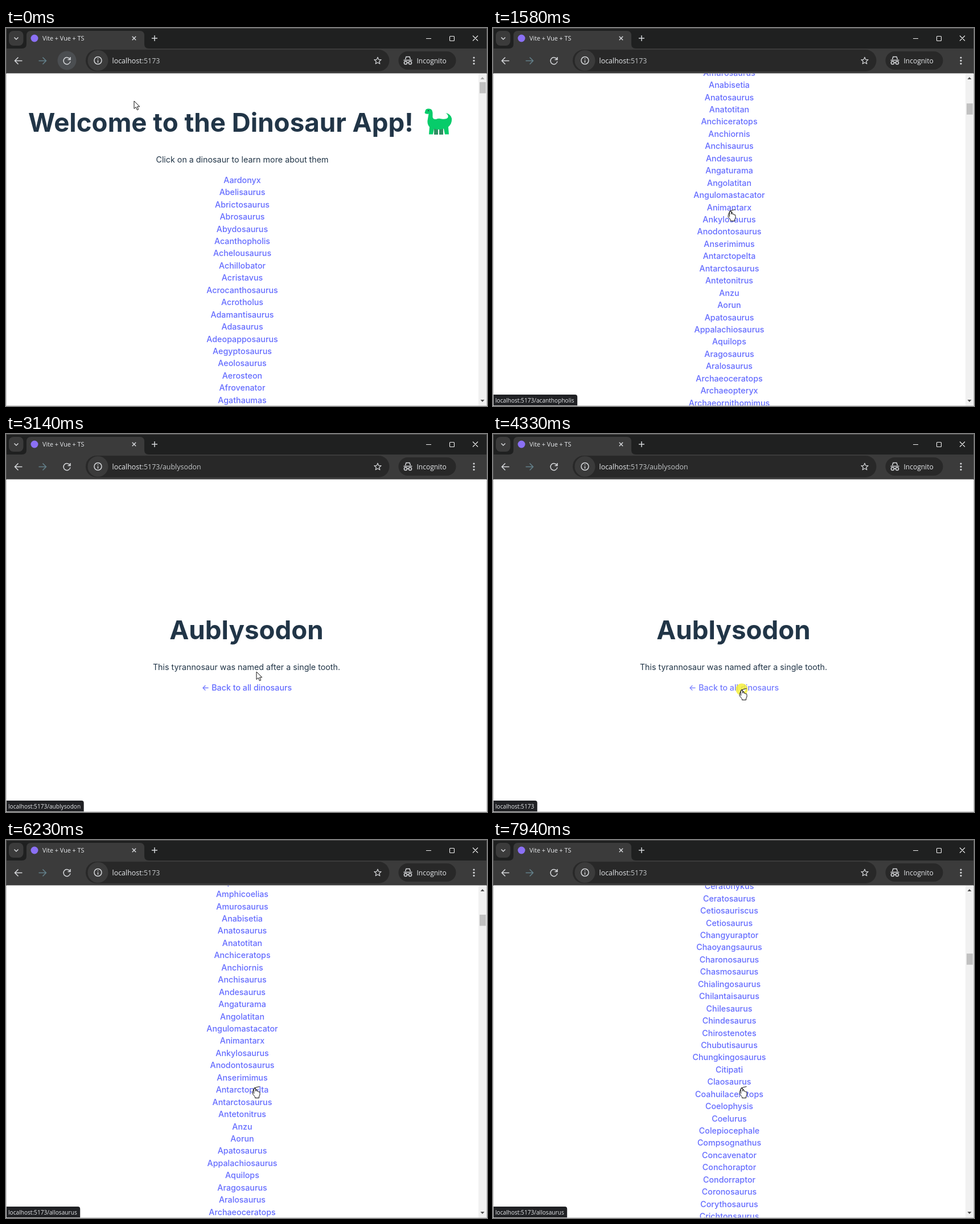
An HTML page that plays this animation: 845 by 663 pixels, repeating every 8 s.

```html
<!DOCTYPE html>
<html lang="en">
<head>
<meta charset="utf-8">
<title>Dinosaur App</title>
<style>
  html, body { margin: 0; width: 100%; height: 100%; overflow: hidden; background: #fff; }
  svg { display: block; }
  .ui { font-family: "Open Sans", sans-serif; fill: #e8eaed; white-space: pre; }
  .page { font-family: Inter, sans-serif; font-size: 14.29px; fill: #213547; }
  .page h1, .title { font-size: 45.7px; font-weight: 700; }
  .link { font-weight: 500; fill: #646cff; }
  .link.hover { fill: #747bff; }
  .mid { text-anchor: middle; }
  .icon { fill: none; stroke: #d5d7da; stroke-width: 1.5; }
  .thin { stroke: #eee; stroke-width: 1.1; }
</style>
</head>
<body>
<svg id="stage" width="845" height="663" viewBox="0 0 845 663">
  <defs>
    <clipPath id="view"><rect x="1" y="80" width="843" height="582"/></clipPath>
  </defs>
  <rect width="845" height="663" fill="#fff"/>

  <g class="page" clip-path="url(#view)">
    <g id="list">
      <text class="title" x="39" y="181.6">Welcome to the Dinosaur App!</text>
      <g id="dino">
        <path fill="#2f8f62" d="M752 174h7v13h-7zM761 174h7v13h-7z"/>
        <path fill="#07cc6a" d="M737 144q1-3 6-2.500q6 0 6.500 7v8q1 4 6 3.500q5-2 10-.5q9 1 11-3q1-4-4-7.500q9 2 10.500 9.500q1 9-6 15l1 13h-7l-2-10q-9 3-17 0l-2 10h-7l1-13q-4-4-3.500-11l2-12q-6 1-7-2z"/>
        <circle cx="742" cy="145" r="1" fill="#213547"/>
      </g>
      <text class="mid" x="415" y="236">Click on a dinosaur to learn more about them</text>
      <g id="rows" class="mid"></g>
    </g>
    <g id="detail" class="mid">
      <text class="title" x="422.500" y="360">Aublysodon</text>
      <text x="422.500" y="414">This tyrannosaur was named after a single tooth.</text>
      <text id="back" class="link" x="423" y="449.600">← Back to all dinosaurs</text>
    </g>
    <g id="bar">
      <rect x="830" y="80" width="14" height="582" fill="#f1f1f1"/>
      <path id="up" d="M833.500 90h7l-3.500-4z"/>
      <path d="M833.500 652h7l-3.500 4z" fill="#505050"/>
      <rect id="thumb" x="832" y="95" width="11" height="19.500" fill="#c1c1c1"/>
    </g>
  </g>

  <!-- browser window -->
  <rect width="845" height="36" fill="#1f2020"/>
  <rect y="36" width="845" height="43.500" fill="#3b3b3b"/>
  <path d="M28 36q8 0 8-8V13q0-8 8-8h191q8 0 8 8v15q0 8 8 8z" fill="#3b3b3b"/>
  <rect x="5" y="5" width="25.500" height="26" rx="8" fill="#3b3b3b"/>
  <path class="icon" d="M14.500 16.500l3.500 3.500 3.500-3.500"/>
  <circle cx="50" cy="18" r="6.500" fill="#8b70f5"/>
  <text class="ui" x="64" y="22" font-size="10.800">Vite + Vue + TS</text>
  <path class="icon" d="M221.800 14.800l6.400 6.400m0-6.400l-6.400 6.400M256 18h10m-5-5v10"/>
  <path class="icon thin" d="M738 18.500h9M780.500 14.500h6q1 0 1 1v6q0 1-1 1h-6q-1 0-1-1v-6q0-1 1-1M820 13.500l9 9m0-9l-9 9"/>

  <circle id="press" cx="107" cy="57" r="16.500" fill="#4b4e51"/>
  <path class="icon" d="M28.500 57.500H15.500m6-6l-6 6 6 6"/>
  <path class="icon" style="stroke:#63808a" d="M57.500 57.500h13m-6-6l6 6-6 6"/>
  <path class="icon" d="M112.200 54.500a6 6 0 1 0 .8 4M113 51v4.500h-4.500"/>
  <rect x="140" y="38" width="533.500" height="38" rx="19" fill="#282828"/>
  <circle cx="161.500" cy="57" r="18" fill="#3b3b3b"/>
  <circle class="icon" cx="161.500" cy="57" r="6.500"/>
  <path class="icon" d="M161.500 56.500v4.300M161.500 53.200v1.600"/>
  <text class="ui" x="186.500" y="61.500" font-size="12.450">localhost<tspan id="path" fill="#c4c7c9"></tspan></text>
  <path class="icon" stroke-linejoin="round" style="stroke-width:1.200" d="M653 51.200l1.700 4.100 4.400.3-3.400 2.900 1.100 4.300-3.800-2.300-3.800 2.300 1.100-4.300-3.400-2.900 4.400-.3z"/>
  <rect x="689.500" y="41" width="101" height="32" rx="16" fill="#282828"/>
  <path class="icon" d="M698.500 56.500h15M701.500 55l1.500-4.500h6l1.500 4.500M705 61q1-1 2 0"/>
  <circle class="icon" cx="702" cy="61" r="2.600"/>
  <circle class="icon" cx="710" cy="61" r="2.600"/>
  <text class="ui" x="721.500" y="61.800" font-size="12">Incognito</text>
  <g fill="#d5d7da"><circle cx="822" cy="52" r="1.600"/><circle cx="822" cy="57.300" r="1.600"/><circle cx="822" cy="62.600" r="1.600"/></g>

  <g id="status">
    <path id="tag" fill="#202124"/>
    <text class="ui" id="hint" x="4" y="656.800" font-size="10.150"></text>
  </g>
  <path d="M.5 80V662.500H844.500V80" fill="none" stroke="#c6c6c6"/>
  <path d="M.5 80V.5H844.500V80" fill="none" stroke="#555"/>

  <g id="mouse">
    <circle id="glow" r="10.500" fill="#f5ee3c" opacity=".85"/>
    <path id="arrow" fill="#fff" stroke="#111" d="M0 0V13.500L3.200 10.700 5.500 15.800 7.700 14.800 5.500 9.900H9.800Z"/>
    <path id="hand" fill="#fff" stroke="#111" stroke-linejoin="round" d="M-1.500 11V1.500Q0-1 1.500 1.500V6.500Q3-.500 4.200 7Q5.500 5 6.600 7.800Q8.800 6.500 9 9.500V13L7.500 16V18.500H.500V16.500L-4 11Q-4-.500+8.500-1.500 11"/>
  </g>
</svg>
<script>
const LOOP = 8000, PITCH = 21.44, FIRST = 271.8;
const $ = id => document.getElementById(id);
const names = `Aardonyx Abelisaurus Abrictosaurus Abrosaurus Abydosaurus Acanthopholis Achelousaurus Achillobator
Acristavus Acrocanthosaurus Acrotholus Adamantisaurus Adasaurus Adeopapposaurus Aegyptosaurus Aeolosaurus Aerosteon
Afrovenator Agathaumas Agilisaurus Agujaceratops Agustinia Ajkaceratops Alamosaurus Alaskacephale Albalophosaurus
Albertaceratops Albertadromeus Albertonykus Albertosaurus Alectrosaurus Aletopelta Alioramus Allosaurus Altirhinus
Alvarezsaurus Alwalkeria Alxasaurus Amargasaurus Amazonsaurus Ammosaurus Ampelosaurus Amphicoelias Amurosaurus
Anabisetia Anatosaurus Anatotitan Anchiceratops Anchiornis Anchisaurus Andesaurus Angaturama Angolatitan
Angulomastacator Animantarx Ankylosaurus Anodontosaurus Anserimimus Antarctopelta Antarctosaurus Antetonitrus Anzu
Aorun Apatosaurus Appalachiosaurus Aquilops Aragosaurus Aralosaurus Archaeoceratops Archaeopteryx Archaeornithomimus
Arcovenator Arcusaurus Argentinosaurus Argyrosaurus Aristosuchus Arrhinoceratops Astrodon Asylosaurus Atlasaurus
Atlascopcosaurus Atrociraptor Aublysodon Aucasaurus Auroraceratops Australodocus Australovenator Austroraptor
Austrosaurus Avaceratops Aviatyrannis Avimimus Bactrosaurus Bagaceratops Bagaraatan Bahariasaurus Balaur Bambiraptor
Barapasaurus Barilium Barosaurus Barsboldia Baryonyx Batyrosaurus Becklespinax Beipiaosaurus Beishanlong Bellusaurus
Berberosaurus Bicentenaria Bistahieversor Bonapartenykus Bonitasaura Borogovia Bothriospondylus Brachiosaurus
Brachyceratops Brachylophosaurus Brachytrachelopan Bravoceratops Brontomerus Bruhathkayosaurus Buitreraptor
Byronosaurus Camarasaurus Camarillasaurus Camelotia Camptosaurus Carcharodontosaurus Carnotaurus Caudipteryx
Cedarosaurus Cedarpelta Cedrorestes Centrosaurus Cerasinops Ceratonykus Ceratosaurus Cetiosauriscus Cetiosaurus
Changyuraptor Chaoyangsaurus Charonosaurus Chasmosaurus Chialingosaurus Chilantaisaurus Chilesaurus Chindesaurus
Chirostenotes Chubutisaurus Chungkingosaurus Citipati Claosaurus Coahuilaceratops Coelophysis Coelurus Colepiocephale
Compsognathus Concavenator Conchoraptor Condorraptor Coronosaurus Corythosaurus Crichtonsaurus Cruxicheiros`.split(/\s+/);

const rows = names.map((name, i) => {
  const row = document.createElementNS("http://www.w3.org/2000/svg", "text");
  row.textContent = name;
  row.setAttribute("x", 415);
  row.setAttribute("y", FIRST + i * PITCH);
  $("rows").append(row);
  return row;
});

// Wheel bursts: start, interval, scroll offsets
const bursts = [
  [510, 90, [10, 55, 170, 310, 460, 599.4, 625]],
  [1230, 86, [660, 770, 900, 1010, 1110, 1161]],
  [1920, 86, [1180, 1270, 1390, 1510, 1603.5, 1607, 1640, 1680, 1696.5]],
  [4490, 0, [0]],
  [5020, 85, [15, 60, 129, 185, 225.9, 440, 536]],
  [5800, 86, [560, 680, 820, 960, 1050, 1072.1]],
  [6490, 85, [1110, 1290, 1520, 1720, 1786]],
  [7090, 86.5, [1840, 2070, 2310, 2411]],
  [7680, 86.5, [2470, 2680, 2920, 3101.4]]
];
const scrolls = [[0, 0], ...bursts.flatMap(([t, dt, ys]) => ys.map((y, i) => [t + i * dt, y]))];

// time, x, y, shape
const moves = [
  [0, 225, 128, "arrow"], [70, 285, 182, "arrow"], [157, 350, 245, "arrow"], [243, 398, 290, "arrow"],
  [330, 417, 308, "hand"], [510, 417, 320, "hand"], [3040, 426, 362, "arrow"], [3140, 440, 417, "arrow"],
  [3640, 440, 428, "arrow"], [3820, 439, 438, "hand"], [3905, 438, 442, "hand"], [4075, 437, 445, "hand"],
  [4160, 437, 448, "hand"], [5020, 437, 444, "hand"], [5530, 437, 434, "hand"]
];
const pages = [[0, "list"], [3040, "detail"], [4490, "loading"], [4580, "list"]];
const hovers = [[0, -1], [330, 2], [600, 5], [2610, 82], [3040, -1], [5020, 8], [5530, 33]];
const hints = [
  [0, "", 0], [600, "/acanthopholis", 1], [2610, "/aublysodon", 1], [3380, "/aublysodon", .5], [3470, "", 0],
  [3905, "", 1], [4760, "", .5], [4840, "", 0], [5020, "/acristavus", 1], [5530, "/allosaurus", 1]
];
const clicks = [[0, false], [2940, true], [3040, false], [4330, true], [4490, false]];

const at = (keys, t) => keys.findLast(k => k[0] <= t);
const show = (id, on) => { $(id).style.display = on ? "" : "none"; };
rows.forEach(r => r.setAttribute("class", "link"));

function draw(t) {
  const page = at(pages, t)[1], y = at(scrolls, t)[1], hover = at(hovers, t)[1];
  const listed = page === "list";
  show("list", page !== "detail");
  show("detail", page === "detail");
  show("rows", listed);
  show("bar", listed);
  $("list").setAttribute("transform", listed ? `translate(0 ${-y})` : "translate(7.5 178.5)");
  $("thumb").setAttribute("y", 95 + y * .0336);
  $("up").setAttribute("fill", y ? "#505050" : "#a3a3a3");
  rows.forEach((r, i) => r.classList.toggle("hover", i === hover));
  $("back").classList.toggle("hover", t >= 3820);
  $("path").textContent = ":5173" + (page === "detail" ? "/aublysodon" : "");
  show("press", t < 70);

  const [, hint, alpha] = at(hints, t);
  $("status").style.opacity = alpha;
  $("hint").textContent = "localhost:5173" + hint;
  const w = 8.5 + $("hint").getComputedTextLength();
  $("tag").setAttribute("d", `M1 643H${w - 3}q4 0 4 4V662H1z`);

  const [, mx, my, shape] = at(moves, t);
  $("mouse").setAttribute("transform", `translate(${mx} ${my})`);
  show("arrow", shape === "arrow");
  show("hand", shape === "hand");
  show("glow", at(clicks, t)[1]);
}

const start = performance.now();
function tick() {
  draw((performance.now() - start) % LOOP);
  requestAnimationFrame(tick);
}
tick();
</script>
</body>
</html>
```
